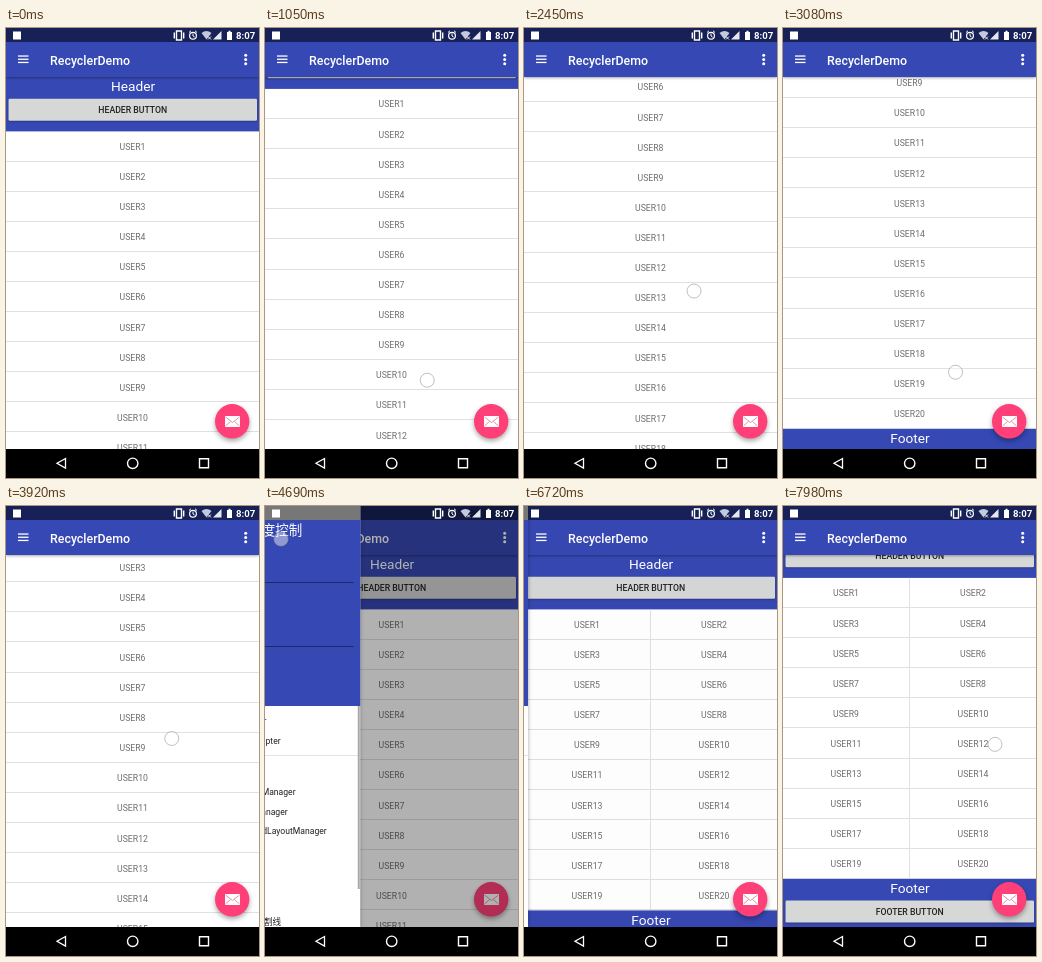
Write an HTML page with a canvas that moves like this. It is 253 px wide and 450 px high and loops after 8000 ms.

```html
<!DOCTYPE html>
<html lang="en">
<head>
<meta charset="utf-8">
<title>RecyclerDemo</title>
<style>
html, body { margin: 0; width: 100%; height: 100%; overflow: hidden; background: #000; }
canvas { display: block; width: 253px; height: 450px; }
</style>
</head>
<body>
<canvas></canvas>
<script>
const W = 253, H = 450, LOOP = 8000, STEP = 70;
const BLUE = '#3648b3', PINK = '#ff4078', GRAY = '#6c6c6c', LINE = '#e0e0e0';
const ROW = 30.1, LIST_TOP = 103.4, BOTTOM = 421, DRAWER = 172.4;
const canvas = document.querySelector('canvas');
const ctx = canvas.getContext('2d');
const dpr = window.devicePixelRatio || 1;
canvas.width = W * dpr;
canvas.height = H * dpr;

// [time, scroll offset]
const SCROLL = [[700, 0], [1400, 85], [1750, 98], [1820, 102], [2450, 210], [2700, 235],
  [3080, 304.5], [3260, 338], [3330, 338], [3700, 178], [3850, 150], [4130, 20], [4300, 0],
  [7070, 0], [7980, 31.5]];
// [start, end, x0, y0, x1, y1]
const TOUCHES = [
  [770, 1400, 160, 390, 165, 305], [1750, 2450, 164, 375, 170, 263],
  [2870, 3260, 172, 383, 173, 311], [3330, 3700, 165, 150, 168, 310],
  [3850, 4130, 165, 200, 168, 330], [4480, 4830, 16, 33, 16, 33],
  [6160, 6370, 40, 306, 40, 306], [7140, 7990, 212, 267, 212, 238]];

const clamp = v => Math.max(0, Math.min(1, v));
const mix = (a, b, u) => a + (b - a) * u;
const settle = (t, start) => 1 - (1 - clamp((t - start) / 336)) ** 3;

function track(keys, t) {
  const i = keys.findIndex(k => k[0] > t);
  if (i === 0) return keys[0][1];
  if (i < 0) return keys[keys.length - 1][1];
  const [a, b] = [keys[i - 1], keys[i]];
  return mix(a[1], b[1], (t - a[0]) / (b[0] - a[0]));
}

function rect(x, y, w, h, color) {
  ctx.fillStyle = color;
  ctx.fillRect(x, y, w, h);
}

function text(s, x, y, size, color, align = 'left', weight = 400) {
  ctx.font = `${weight} ${size}px Roboto, "Noto Sans CJK SC", "Noto Sans CJK", sans-serif`;
  ctx.textAlign = align;
  ctx.textBaseline = 'middle';
  ctx.fillStyle = color;
  ctx.fillText(s, x, y + 0.9);
}

function circle(x, y, r, fill, stroke, width = 1) {
  ctx.beginPath();
  ctx.arc(x, y, r, 0, 7);
  if (fill) { ctx.fillStyle = fill; ctx.fill(); }
  if (stroke) { ctx.strokeStyle = stroke; ctx.lineWidth = width; ctx.stroke(); }
}

function path(d, fill, stroke, width = 1) {
  const p = new Path2D(d);
  if (fill) { ctx.fillStyle = fill; ctx.fill(p); }
  if (stroke) { ctx.strokeStyle = stroke; ctx.lineWidth = width; ctx.stroke(p); }
}

function shadowed(blur, dy, draw) {
  ctx.save();
  ctx.shadowColor = 'rgba(0,0,0,.35)';
  ctx.shadowBlur = blur * dpr;
  ctx.shadowOffsetY = dy * dpr;
  draw();
  ctx.restore();
}

function button(label, x, y, w, h, size, weight) {
  shadowed(1.5, 0.7, () => {
    ctx.beginPath();
    ctx.roundRect(x, y, w, h, 1.2);
    ctx.fillStyle = '#d6d7d7';
    ctx.fill();
  });
  text(label, x + w / 2, y + h / 2 - 0.4, size, '#222', 'center', weight);
}

function banner(name, y, h) {
  rect(0, y, W, h, BLUE);
  text(name, 127, y + 9.5, 13.7, '#fff', 'center');
  button(name.toUpperCase() + ' BUTTON', 2.5, y + 21.7, 248.5, 22, 8.7, 500);
}

function list(scroll, cols) {
  ctx.save();
  ctx.beginPath();
  ctx.rect(0, 49, W, BOTTOM - 49);
  ctx.clip();
  rect(0, 49, W, BOTTOM - 49, '#fff');
  banner('Header', 49 - scroll, LIST_TOP - 49);
  const top = LIST_TOP - scroll, rows = 20 / cols;
  for (let i = 0; i < 20; i++) {
    const y = top + Math.floor(i / cols) * ROW;
    const x = cols === 1 ? 126.5 : i % 2 ? 190 : 63;
    text('USER' + (i + 1), x, y + 15.1, 8.7, GRAY, 'center');
    rect(0, Math.round(y + ROW) - 1, W, 1, LINE);
  }
  if (cols === 2) rect(126, top, 1, rows * ROW, LINE);
  banner('Footer', top + rows * ROW, 55);
  ctx.restore();
}

function toolbar() {
  shadowed(2.5, 0.6, () => rect(0, 14, W, 35, BLUE));
  rect(0, 0, W, 14, '#172158');
  for (const y of [28, 31.2, 34.4]) rect(12, y - 0.6, 10.5, 1.3, '#fff');
  for (const y of [27.3, 31.5, 35.7]) circle(239.7, y, 1.5, '#fff');
  text('RecyclerDemo', 44, 32, 12.4, '#fff', 'left', 500);
}

function mailButton() {
  shadowed(5, 2.5, () => circle(226.2, 393.3, 17.2, PINK));
  rect(219, 388, 15, 11, '#fff');
  path('M219.5 389 L226.5 394.5 L233.5 389 M219.5 398 L224.5 393.5 M233.5 398 L228.5 393.5', null, '#e0869c', 0.9);
}

function radio(label, x, y, on) {
  circle(x, y, 5.5, null, on ? PINK : '#666', 1.2);
  if (on) circle(x, y, 2.9, PINK);
  text(label, x + 10, y, 8.6, '#222');
}

function field(label, value, y) {
  text(label, 8, y, 7.4, '#202c70');
  text(value, 8, y + 17.2, 11, '#fff');
  rect(8, y + 25, 158, 1, '#1e2965');
}

function drawer(open, grid) {
  if (open <= 0) return;
  rect(0, 0, W, BOTTOM, `rgba(0,0,0,${0.62 * open ** 1.2})`);
  ctx.save();
  ctx.beginPath();
  ctx.rect(0, 0, W, BOTTOM);
  ctx.clip();
  ctx.translate((open - 1) * DRAWER, 0);
  shadowed(4, 0, () => rect(0, 0, DRAWER, BOTTOM, '#fff'));
  rect(0, 0, DRAWER, 200, BLUE);
  rect(0, 0, DRAWER, 14, '#777');
  text('分割线宽度控制', 20, 24, 13.5, '#fff');
  field('请输入分割线宽度', '1', 51);
  field('请输入网格span值', '2', 115);
  button('确认重设', 3, 164.5, 48.5, 22, 9, 400);
  radio('Simple Adapter', 10, 215, true);
  radio('Secondary Adapter', 10, 235, false);
  rect(0, 249, DRAWER, 1, '#e4e4e4');
  text('LayoutManager', 5, 266, 8.7, GRAY);
  radio('LinearLayoutManager', 14.5, 286, !grid);
  radio('GridLayoutManager', 14.5, 305.5, grid);
  radio('StaggeredGridLayoutManager', 14.5, 325, false);
  text('分割线样式', 5, 356, 8.7, GRAY);
  radio('线条', 14.5, 376, true);
  radio('透明', 14.5, 396, false);
  radio('自定义图片分割线', 14.5, 415.5, false);
  // The scrollbar has faded by the time the grid is chosen.
  if (!grid) rect(169.9, 200, 2, 183, '#a8a8a8');
  ctx.restore();
}

function statusIcons() {
  const c = '#fff';
  rect(7, 3.5, 8, 8, c);
  path('M170.5 3 h5 v9 h-5 z M168.3 4.5 v6 M177.7 4.5 v6', null, c, 1.4);
  circle(187, 7.7, 3.4, null, c, 1.2);
  path('M187 5.5 v2.5 l1.6 1 M183 4.5 l2 -1.8 M191 4.5 l-2 -1.8', null, c, 1);
  path('M195.5 5 Q200.5 1 205.5 5 L200.5 11.5 z', '#c5c9dc');
  path('M202 8.5 l3 3 M205 8.5 l-3 3', null, c, 0.9);
  path('M215.5 3 V11.5 H207 z', '#e6e8f0');
  path('M221 4 h1.5 v-1.2 h2 v1.2 h1.5 v8 h-5 z', c);
  text('8:07', 249.3, 6.9, 9.6, c, 'right', 700);
}

function navBar() {
  rect(0, BOTTOM, W, H - BOTTOM, '#000');
  path('M59.5 430.5 v9.6 l-8.5 -4.8 z', null, '#fff', 1.3);
  circle(126.7, 435.3, 5.2, null, '#fff', 1.4);
  path('M193.5 430.8 h9 v9 h-9 z', null, '#fff', 1.4);
}

function touch(t) {
  for (const [start, end, x0, y0, x1, y1] of TOUCHES) {
    if (t < start || t > end) continue;
    const u = (t - start) / (end - start);
    circle(mix(x0, x1, u), mix(y0, y1, u), 7, 'rgba(255,255,255,.45)', 'rgba(150,150,150,.6)');
  }
}

function frame(now) {
  const t = Math.floor((now % LOOP) / STEP) * STEP;
  const grid = t >= 6300;
  ctx.setTransform(dpr, 0, 0, dpr, 0, 0);
  list(track(SCROLL, t), grid ? 2 : 1);
  toolbar();
  mailButton();
  drawer(settle(t, 4611) - settle(t, 6480), grid);
  statusIcons();
  navBar();
  touch(t);
  requestAnimationFrame(frame);
}
requestAnimationFrame(frame);
</script>
</body>
</html>
```
